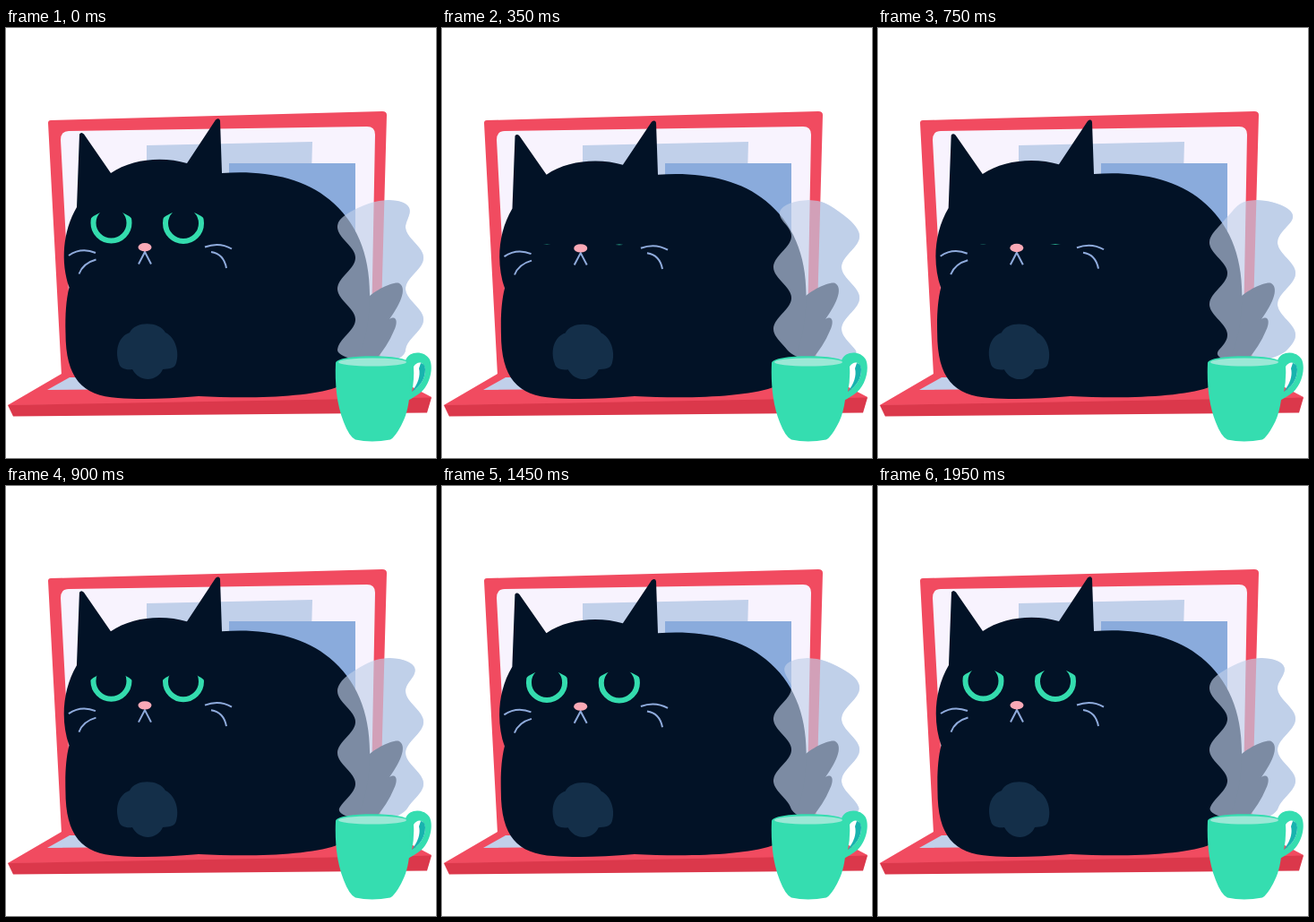
These frames come from a looping animation (480x480 px, 2000 ms). An HTML page:

```html
<!DOCTYPE html>
<html lang="en">
<head>
<meta charset="utf-8">
<title>Cat on a laptop</title>
<style>
  html, body { margin: 0; width: 100%; height: 100%; overflow: hidden; background: #fff; }
  svg { display: block; width: 100vw; height: 100vh; }
</style>
</head>
<body>
<svg viewBox="0 0 480 480">
  <defs>
    <clipPath id="openLeft"><circle class="lid" cx="117.5" r="36"/></clipPath>
    <clipPath id="openRight"><circle class="lid" cx="198" r="36"/></clipPath>
  </defs>

  <!-- Solid steam behind the scene, translucent steam in front of it -->
  <path class="steam" fill="#c1d0ea"/>

  <g id="laptop">
    <path fill="#f14b60" d="M47 106Q47 103 50 103L420 93Q425 93 425 97L417 388H62Z"/>
    <path fill="#f8f3fe" d="M61 125Q61 115 70 115L403 110Q412 110 412 119L407 388H75Z"/>
    <path fill="#c1d0ea" d="M157 131L342 127L340 200H157Z"/>
    <path fill="#8aabdc" d="M249 151H390V260H249Z"/>
    <path fill="#f14b60" d="M2 421L62 386H425L475 412L470 420Z"/>
    <path fill="#c1d0ea" d="M46 404L71 390H380V401Z"/>
    <path fill="#db384b" d="M2 421L475 412.5L470 429.5L8 433.5Z"/>
  </g>

  <path fill="#021226" d="M398 306C410 294 428 284 438 284.5C448 289 442 306 428 325C436 320 438 328 433 338C428 350 421 360 414 369L375 380Z"/>

  <g id="cat">
    <path fill="#021226" d="M82 118.5Q84 115.5 87 118.5L117 162C140 146 175 143 202 151L234 102.5Q238 99.5 239 103.5L241 162
      C285 158.5 331 166 361 191.5C391 216 406 252 406 297C406 340 396 378 368 401.5C335 412.5 270 414 215 411
      C180 414 150 415 125 413C85 410.5 66.5 391 66.5 340C66 320 67 304 70.5 289.5C61 262 63 227 79 200Z"/>
    <path fill="#142f49" d="M138 340C144 327 171 327 178 340C189 345 194 362 190 374C188 381 181 380 175 381
      C169 395 149 396 141 381C134 382 127 380 126 374C121 359 126 344 138 340Z"/>
    <g fill="none" stroke="#34dcae" stroke-width="6">
      <circle cx="117.5" cy="217.5" r="20" clip-path="url(#openLeft)"/>
      <circle cx="198" cy="218" r="20" clip-path="url(#openRight)"/>
    </g>
    <g fill="none" stroke="#8fabdc" stroke-width="2">
      <path d="M148 263.5L155 250L162 263.5"/>
      <path d="M70 254Q84 244.5 100 251M81.5 274.5Q86 262.5 100.5 258.5M222 244.5Q238 238.5 252 246.5M229 250Q243 252 246 268"/>
    </g>
    <ellipse cx="155" cy="244.7" rx="7.5" ry="4.7" fill="#f9a9b6"/>
  </g>

  <path class="steam" fill="#c1d0ea" fill-opacity=".64"/>

  <g id="mug" fill="#35ddb0">
    <path fill-rule="evenodd" d="M446 371C450 360 467 360 473 370C478 381 472 402 460 409Q453 414 446 417Z
      M455 378C459 371 467 372 468 381C468 391 463 400 453 406Q456 392 455 378Z"/>
    <path fill="#18b3ae" d="M463 374Q468 375 468 381C468 391 463 400 453 406C460 397 463 388 461 380Z"/>
    <path d="M368 374C368 363.5 450 363.5 450 374C452 399 452 425 441 444Q434 457 429 459.5Q408 463.5 390 459.5
      Q383 456 377 440C369 420 367 396 368 374Z"/>
    <ellipse cx="409" cy="373" rx="38" ry="4.5" fill="#9be8d6"/>
  </g>
</svg>
<script>
const cat = document.getElementById('cat');
const steam = document.querySelectorAll('.steam');
const lids = document.querySelectorAll('.lid');
const TAU = 2 * Math.PI;

const clamp = x => Math.max(0, Math.min(1, x));
const ease = x => x < .5 ? 4 * x ** 3 : 1 - 4 * (1 - x) ** 3;
const ramp = (t, from, to) => ease(clamp((t - from) / (to - from)));
const cap = x => Math.sqrt(1 - (1 - clamp(x)) ** 2);

// A rising wavy ribbon with rounded ends.
function steamPath(t) {
  const left = [], right = [];
  for (let y = 192; y <= 373; y++) {
    const mid = 418 - 10 * Math.cos(TAU * ((y - 222) / 69 + t / 1000));
    const half = 38 * cap((y - 192) / 26) * cap((373 - y) / 14);
    left.push(`${(mid - half).toFixed(1)} ${y}`);
    right.unshift(`${(mid + half).toFixed(1)} ${y}`);
  }
  return `M${left.concat(right).join('L')}Z`;
}

function draw(t) {
  const breath = (1 - Math.cos(TAU * t / 1000)) / 2;
  cat.setAttribute('transform',
    `translate(240 412) scale(${1 + .004 * breath} ${1 - .009 * breath}) translate(-240 -412)`);
  const blink = ramp(t, 100, 450) - ramp(t, 650, 1000);
  lids.forEach(lid => lid.setAttribute('cy', 240 + 40 * blink));
  const d = steamPath(t);
  steam.forEach(path => path.setAttribute('d', d));
}

const start = performance.now();
function tick() {
  const t = (performance.now() - start) % 2000;
  draw(Math.floor(t / 50) * 50);
  requestAnimationFrame(tick);
}
tick();
</script>
</body>
</html>
```
